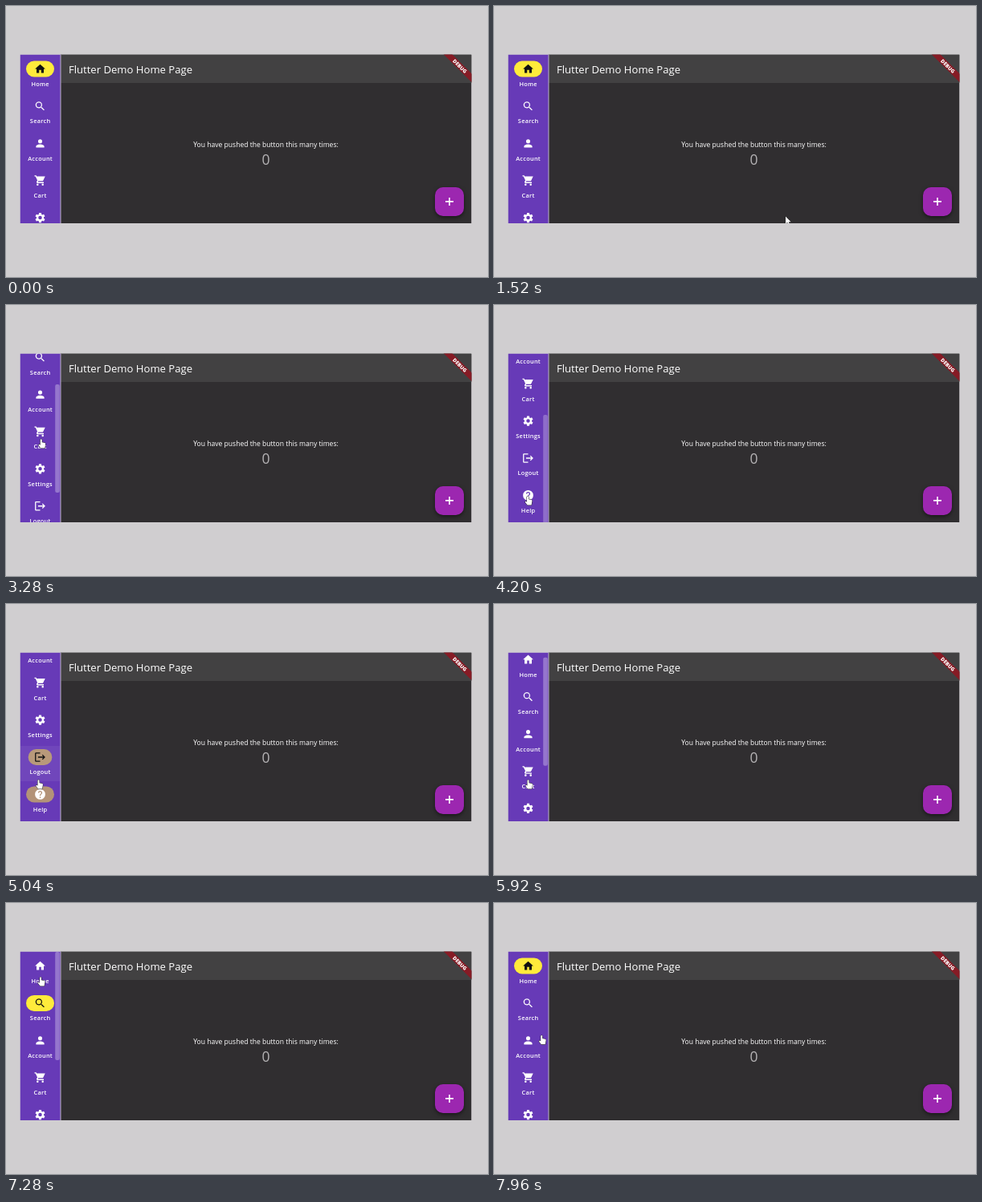
An HTML page with a canvas for the animation above (8 s loop, 600 by 338 pixels).

```html
<!DOCTYPE html>
<html lang="en">
<head>
<meta charset="utf-8">
<title>Navigation rail</title>
<style>
html, body { margin: 0; width: 100%; height: 100%; overflow: hidden; background: #d0ced0; }
canvas { display: block; }
</style>
</head>
<body>
<canvas id="stage" width="600" height="338"></canvas>
<script>
const ctx = document.getElementById('stage').getContext('2d');
const LOOP = 8000, PITCH = 46.4, MAX_SCROLL = 119.5;
const APP = { x: 17.5, y: 60.5, w: 562, h: 210.5 };
const FONT = '"Open Sans", "Noto Sans", sans-serif';

function gear() {
  const path = new Path2D();
  for (let k = 0; k < 6; k++)
    for (const [offset, r] of [[-23, 7], [-13, 9.8], [13, 9.8], [23, 7]]) {
      const a = (k * 60 - 90 + offset) * Math.PI / 180;
      path.lineTo(12 + r * Math.cos(a), 12 + r * Math.sin(a));
    }
  path.closePath();
  path.moveTo(15.5, 12);
  path.arc(12, 12, 3.5, 0, 7);
  return path;
}

// Icons live on a 24 unit grid.
const items = [
  ['Home', 'M10 20v-6h4v6h5v-8h3L12 3 2 12h3v8z'],
  ['Search', 'M9.5 3a6.5 6.5 0 1 0 4.2 11.4l.3.3v.8l5 5 1.5-1.5-5-5h-.8l-.3-.3A6.5 6.5 0 0 0 9.5 3zM9.5 5a4.5 4.5 0 1 1 0 9a4.5 4.5 0 1 1 0-9z'],
  ['Account', 'M12 4a4 4 0 1 0 0 8a4 4 0 1 0 0-8zM12 14c-2.7 0-8 1.3-8 4v2h16v-2c0-2.7-5.3-4-8-4z'],
  ['Cart', 'M7 18a2 2 0 1 0 0 4a2 2 0 1 0 0-4zM17 18a2 2 0 1 0 0 4a2 2 0 1 0 0-4zM1 2v2h2l3.6 7.6-1.4 2.4C4.5 15.4 5.5 17 7 17h12v-2H7.4l1.1-2H16c.8 0 1.4-.4 1.8-1L21.7 4H5.2l-.9-2z'],
  ['Settings', gear()],
  ['Logout', 'M17 7l-1.4 1.4L18.2 11H8v2h10.2l-2.6 2.6L17 17l5-5zM4 5h8V3H4a2 2 0 0 0-2 2v14a2 2 0 0 0 2 2h8v-2H4z'],
  ['Help', 'M12 2a10 10 0 1 0 0 20a10 10 0 1 0 0-20zM11 17h2v2h-2zM15.1 11.2l-.9 1C13.4 12.9 13 13.5 13 15h-2v-.5c0-1.1.4-2.1 1.2-2.8l1.2-1.3c.4-.4.6-.9.6-1.4a2 2 0 0 0-4 0H8a4 4 0 0 1 8 0c0 .9-.4 1.7-.9 2.2z']
].map(([label, shape]) => ({ label, icon: new Path2D(shape) }));

const arrow = new Path2D('M0 0V9.2L2.1 7.3 3.4 10.2 5 9.5 3.7 6.7H6.6z');
const hand = new Path2D('M-1 .9Q0-.4 1 .9V4.2L4.6 5Q5.6 5.4 5.4 6.6L4.6 11.6H-.4L-3 8.2Q-3.6 6.8-2.3 6.7L-1 7.7z');

const clicks = [[-1000, 0], [4300, 6], [4940, 5], [6850, 1], [7400, 0]];
const pointer = [
  [1520, 363, 262.5], [1760, 297, 209], [1920, 295, 208], [2080, 295, 208],
  [2680, 44, 167], [3800, 43.5, 167], [4200, 42, 238], [4500, 42, 238],
  [4840, 40.5, 219], [5200, 40.5, 219], [5480, 42.5, 219], [6320, 42.5, 219],
  [6750, 42, 130], [6950, 42, 130], [7220, 43, 92], [7480, 43, 92], [8000, 59.5, 166]
];

const ramp = (t, a, b) => Math.min(1, Math.max(0, (t - a) / (b - a)));
const smooth = p => p * p * (3 - 2 * p);

const scrollAt = t => MAX_SCROLL * (smooth(ramp(t, 2960, 3600)) - smooth(ramp(t, 5480, 6010)));
const barAlpha = t => ramp(t, 2960, 3120) - ramp(t, 4160, 4460) + ramp(t, 5480, 5640) - ramp(t, 7320, 7620);

function box(x, y, w, h, color, r = 0) {
  ctx.fillStyle = color;
  ctx.beginPath();
  ctx.roundRect(x, y, w, h, r);
  ctx.fill();
}

function text(str, x, y, size, { color = '#fff', weight = 400, align = 'center', spacing = 0 } = {}) {
  ctx.font = `${weight} ${size}px ${FONT}`;
  ctx.letterSpacing = spacing + 'px';
  ctx.textAlign = align;
  ctx.fillStyle = color;
  ctx.fillText(str, x, y);
}

function drawPage() {
  box(68, APP.y, 511.5, APP.h, '#302e30');
  box(68, APP.y, 511.5, 35.5, '#424142');
  text('Flutter Demo Home Page', 78, 84, 13.1, { align: 'left' });
  text('You have pushed the button this many times:', 323.5, 176, 8.57);
  text('0', 323.5, 198, 17.5, { color: '#b5b3b5' });

  ctx.save();
  ctx.shadowColor = 'rgba(0,0,0,.5)';
  ctx.shadowBlur = 5;
  ctx.shadowOffsetY = 2;
  box(534, 226, 36, 36, '#9c27b0', 10);
  ctx.restore();
  box(547, 243.1, 10, 1.6, '#fff');
  box(551.2, 239, 1.6, 10, '#fff');

  ctx.save();
  ctx.translate(579.5, 60.5);
  ctx.rotate(Math.PI / 4);
  box(-30, 16.8, 60, 7.6, '#861b25');
  text('DEBUG', 0, 22.9, 6.3, { weight: 800 });
  ctx.restore();
}

function drawItem(i, y, t, now) {
  const [clickTime, selected] = clicks[now];
  const p = ramp(t, clickTime, clickTime + 200);
  const previous = now ? clicks[now - 1][1] : -1;
  const active = i === selected;

  if (active && t - clickTime < 400)
    box(17.5, y - 14, 50, 44, `rgba(255,255,255,${0.06 * (1 - ramp(t, clickTime + 100, clickTime + 400))})`);
  const alpha = active ? p : i === previous ? 1 - p : 0;
  if (alpha > 0) {
    const w = 35 * (active ? 1 - 0.6 * (1 - p) ** 2 : 1);
    box(42.5 - w / 2, y - 10, w, 20, `rgba(255,235,59,${alpha})`, 10);
  }

  ctx.save();
  ctx.translate(42.5, y);
  ctx.scale(0.64, 0.64);
  ctx.translate(-12, -12);
  ctx.fillStyle = active ? '#111' : '#fff';
  ctx.fill(items[i].icon, 'evenodd');
  ctx.restore();
  text(items[i].label, 42.6, y + 21.4, 7.4, { weight: 600, spacing: 0.25 });
}

function drawRail(t) {
  box(APP.x, APP.y, 50.5, APP.h, '#673ab7');
  const scroll = scrollAt(t);
  const now = clicks.findLastIndex(c => c[0] <= t);
  items.forEach((_, i) => drawItem(i, 78.5 + i * PITCH - scroll, t, now));
  box(61.2, 61 + scroll * 0.635, 5.6, 135, `rgba(255,255,255,${0.3 * barAlpha(t)})`, 2);
  box(67.5, APP.y, 1, APP.h, '#b9b1c4');
}

function drawPointer(t) {
  const k = pointer.findLastIndex(p => p[0] <= t);
  if (k < 0) return;
  const a = pointer[k], b = pointer[Math.min(k + 1, pointer.length - 1)];
  const p = smooth(ramp(t, a[0], b[0]));
  const x = a[1] + (b[1] - a[1]) * p, y = a[2] + (b[2] - a[2]) * p;
  const shape = x < 68 ? hand : arrow;
  ctx.save();
  ctx.translate(x, y);
  ctx.lineWidth = 1;
  ctx.strokeStyle = '#222';
  ctx.stroke(shape);
  ctx.fillStyle = '#fff';
  ctx.fill(shape);
  ctx.restore();
}

function draw(ms) {
  const t = ms % LOOP;
  box(0, 0, 600, 338, '#d0ced0');
  ctx.save();
  ctx.beginPath();
  ctx.rect(APP.x, APP.y, APP.w, APP.h);
  ctx.clip();
  drawPage();
  drawRail(t);
  drawPointer(t);
  ctx.restore();
}

let start;
function tick(now) {
  start ??= now;
  draw(now - start);
  requestAnimationFrame(tick);
}
draw(0);
requestAnimationFrame(tick);
</script>
</body>
</html>
```
